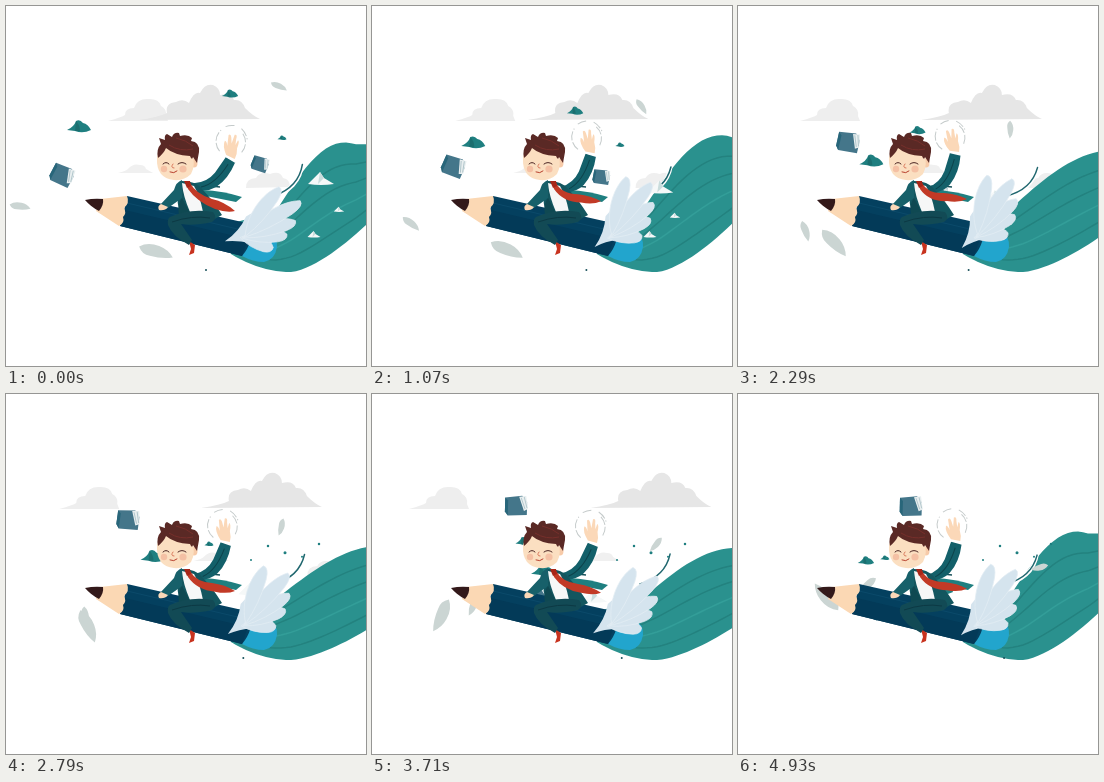
An HTML page for the animation above (5 s loop, 360 px wide and 360 px high).

```html
<!DOCTYPE html>
<html lang="en">
<head>
<meta charset="utf-8">
<title>Pencil flight</title>
<style>
html, body { margin: 0; width: 100%; height: 100%; overflow: hidden; background: #fff; }
svg { display: block; width: 100%; height: 100%; }
</style>
</head>
<body>
<svg viewBox="0 0 360 360">
  <defs>
    <g id="bird">
      <path d="M-12 3Q-5 0-3-6Q1-8 4-4Q9-3 12 3Q4 7-4 4Z"/>
      <path d="M-3-6Q1-2 1 4L-4 4Z" fill="#000" opacity=".13"/>
    </g>
    <g id="dart">
      <path d="M-13 4L-1-8L3-2L13 4Q0 6-13 4Z" fill="#f5f8f8"/>
      <path d="M-1-8L3-2L-3 4Z" fill="#c9dcdc"/>
    </g>
    <g id="book">
      <path d="M-11-8L6-10L11-4L11 9L-8 10L-11 6Z" fill="#44768a"/>
      <path d="M3-9L10-10L12 3L8 5Z" fill="#e9eff0"/>
      <path d="M-11-8L-8-5L-8 10L-11 6Z" fill="#28667a"/>
      <path d="M5-8L9 3M8-9L11 2" stroke="#9fb9bf" stroke-width=".7"/>
    </g>
    <g id="page">
      <path d="M-17-4Q-8-9 3-5Q12-2 17 6Q6 8-6 5Q-14 4-17-4Z" fill="#cbd5d3"/>
    </g>
  </defs>

  <g id="sky">
    <path id="cloudD" fill="#efefef" d="M-22 182Q-22 172-12 172Q-8 165 2 168Q12 164 15 172Q22 173 22 181Z"/>
    <path id="cloudB" fill="#eee" d="M-41 115Q-27 111-24 109Q-24 102-15 102Q-12 93-2 93Q10 92 12 100Q18 103 17 110L19 115Z"/>
    <path id="cloudA" fill="#e6e6e6" d="M-70 114Q-50 111-42 107Q-44 97-33 96Q-26 92-20 97Q-15 85-9 87Q-4 77 4 79Q11 82 11 89Q22 86 25 94Q33 93 36 102Q44 110 51 113Z"/>
    <path id="cloudC" fill="#f0f0f0" d="M-18 167Q-10 165-8 163Q-3 157 4 159Q9 159 10 163L17 167Z"/>
  </g>

  <path id="ribbon" fill="#2a918e"/>
  <g id="strands" fill="none" stroke-linecap="round"></g>
  <g id="swoosh" fill="none" stroke-linecap="round">
    <path d="M298 158C296 176 283 188 264 191" stroke="#fff" stroke-width="4"/>
    <path d="M298 160C295 174 285 185 268 190" stroke="#20676f" stroke-width="1.5"/>
  </g>
  <g id="ink" fill="#1f7f80"></g>
  <g id="drift"></g>
  <circle id="speck" cy="264" r="1" fill="#17505a"/>

  <path d="M196 184Q218 185 236 191L230 196L200 190Z" fill="#1f7f80"/>
  <path d="M196 179L214 181" stroke="#17505a" stroke-width="1.5"/>

  <g id="pencil">
    <path d="M240 217L262 226Q272 230 271 241Q269 254 258 256Q247 256 236 250Z" fill="#22a5cd"/>
    <path d="M121 190L245 218Q248 236 236 250L114 220L118 205Z" fill="#04405f"/>
    <path d="M119 204L242 233L236 250L114 220Z" fill="#033a58"/>
    <path d="M121 197L240 225" stroke="#0b4a6a"/>
    <path d="M94 193L121 190Q124 197 118 202Q121 207 117 211Q119 217 113 220L90 205Z" fill="#fbd8b4"/>
    <path d="M79 194Q88 192 97 193Q98 199 93 205Q85 201 79 194Z" fill="#33191a"/>
  </g>

  <g id="arm">
    <path d="M188 179Q201 177 208 166L217 149L227 153Q222 171 211 180Q203 186 193 185Z" fill="#13606a"/>
    <path d="M196 182Q210 177 220 156" stroke="#0d434c" fill="none"/>
    <path d="M216 149L218 145L229 150L227 154Z" fill="#fff"/>
    <path d="M217 147Q212 138 214 133Q216 133 217 138L217 127Q219 125 220 129L221 135L223 126Q226 125 225 130L225 136L227 131Q229 132 227 139Q228 145 226 150Z" fill="#fbd8b8"/>
    <path d="M210 144A15 15 0 0 1 209 123M213 119A18 18 0 0 1 223 117M231 124A15 15 0 0 1 231 144M229 119A19 19 0 0 1 236 129"
      fill="none" stroke="#c4caca" stroke-dasharray="9 2"/>
  </g>

  <g id="man">
    <path d="M183 235L189 239L188 247L183 249L185 243Z" fill="#c8331f"/>
    <path d="M176 175Q190 175 196 183Q206 193 216 209L205 215L175 211Q170 196 172 184Z" fill="#13565f"/>
    <path d="M176 177L188 180Q194 190 197 206L184 206Q177 190 176 177Z" fill="#f6f7f7"/>
    <path d="M176 174Q170 176 168 184L154 199Q156 204 162 202L176 192Z" fill="#17606a"/>
    <path d="M176 192L184 207L173 209Q171 198 176 192Z" fill="#0f4952"/>
    <path d="M155 198Q151 200 153 204Q159 205 162 201Z" fill="#fbd8b8"/>
    <path d="M164 211Q184 202 207 206Q212 212 206 216Q188 220 175 218L186 234L183 239Q166 230 162 219Q161 213 164 211Z" fill="#124a55"/>
    <path d="M166 216Q186 209 204 212" fill="none" stroke="#0c3944"/>
  </g>
  <path id="tie" fill="#c23a26"/>
  <path d="M178 175L184 175L185 180L181 182Z" fill="#a82618"/>

  <g id="head">
    <ellipse cx="188" cy="157" rx="3.5" ry="4.5" fill="#f7cba9"/>
    <path d="M151 152Q152 142 165 141L186 143Q190 160 185 168Q178 175 168 174Q150 172 151 152Z" fill="#fbdfc1"/>
    <path d="M152 152Q150 143 155 138L153 132L159 134Q158 129 161 128L166 131Q168 126 173 127L174 130Q182 128 186 132L185 135Q194 136 193 146L191 157L187 151Q186 155 184 150Q168 149 160 142Q158 147 152 152Z" fill="#5a2925"/>
    <path d="M163 139Q174 146 187 143M170 132Q180 134 187 140" fill="none" stroke="#762f2b"/>
    <circle cx="158" cy="163" r="3.2" fill="#f3b89c" opacity=".8"/>
    <circle cx="177" cy="163" r="3.6" fill="#f3b89c" opacity=".8"/>
    <g fill="none" stroke="#4a2422" stroke-linecap="round">
      <path d="M157 158Q160 155 163 158M172 158Q176 155 180 158"/>
      <path d="M167 158Q164 162 168 162" stroke="#d9795c"/>
      <path d="M164 166Q168 168 171 165" stroke="#b8402e"/>
    </g>
  </g>

  <g id="wing" fill="#d5e4ee">
    <path d="M221 239Q233 226 236 210Q250 196 262 200Q272 212 268 228Q262 238 246 235Q232 235 221 239Z"/>
  </g>
</svg>
<script>
const LOOP = 5000, FRAMES = 70, WAVE = 645;
const $ = id => document.getElementById(id);
const { sin, cos, min, PI } = Math;

function add(parent, tag, attrs) {
  const el = document.createElementNS('http://www.w3.org/2000/svg', tag);
  for (const k in attrs) el.setAttribute(k, attrs[k]);
  return parent.appendChild(el);
}

const move = (el, x, y = 0, rot = 0, scale = 1) =>
  el.setAttribute('transform', `translate(${x} ${y}) rotate(${rot}) scale(${scale})`);
const turn = (id, deg, x, y) => $(id).setAttribute('transform', `rotate(${deg} ${x} ${y})`);
const show = (id, on) => $(id).setAttribute('visibility', on ? 'visible' : 'hidden');

// Each path gives [x, y, rotation] after s seconds
const line = (x, y, vx, vy) => s => [x + vx * s, y + vy * s, 0];
const drifters = [];
function drift(shape, scale, path) {
  drifters.push({ el: add($('drift'), 'use', { href: '#' + shape, fill: '#1f7f80' }), scale, path });
}
drift('page', 1, s => [110 + 40 * cos(PI * s / 3.75), 245 - 1.7 * s * s, 2 + 5 * s + 1.55 * s ** 3]);
drift('page', .6, s => [14 + 23.5 * s, 200 + 25 * sin(PI * s / 4.4), 27 * s - 5]);
drift('page', .5, s => [273 - 5.5 * s + 2.3 * s * s, 80 + 19 * s, 10 + 28.5 * s]);
drift('book', 1, s => [56 + 23.7 * s, 139 + 30 * cos(PI * s / 4.3), 14 + 14 * cos(PI * s / 4.3)]);
drift('book', .75, s => [254 - 23 * s, 158 + 12 * s, 22 - 10 * s]);
drift('bird', 1, line(73, 121, 26.4, 15));
drift('bird', .68, line(224, 88, -19.5, 16));
drift('bird', .38, line(276, 132, -26.2, 6.5));
drift('dart', 1, line(315, 174, -25, 8));
drift('dart', .4, line(333, 204, -28, 5.6));
drift('dart', .5, line(308, 229, -28, 0));

for (let i = 0; i < 5; i++)
  add($('ink'), 'circle', { cx: 245 + 17 * i, cy: 158 + 8 * cos(2.4 * i), r: 1 + i % 3 * .25 });

// Feathers fan out from the wing root: angle, length
const root = [236, 228];
for (const [angle, len] of [[14, 34], [-10, 45], [-25, 55], [-41, 67], [-63, 60]])
  add($('wing'), 'path', {
    d: `M0 4C${len * .3} -9 ${len * .75} -11 ${len} -2Q${len + 1} 4 ${len * .8} 6Q${len * .4} 9 0 4Z`,
    transform: `translate(${root}) rotate(${angle})`,
    stroke: '#e3edf4', 'stroke-width': .7
  });

const strands = [.22, .42, .62, .82].map((f, i) => ({
  f, el: add($('strands'), 'path', { stroke: i === 2 ? '#339e99' : '#23827f', 'stroke-width': 1.5 })
}));

// Upper edge swells to a crest whose height and reach vary over the loop
function drawRibbon(t) {
  const swing = shift => cos(2 * PI * (t - shift) / LOOP);
  const height = 63 + 13 * swing(900), reach = 88 + 20 * swing(2700), end = 225 - 11 * swing(600);
  const top = x => x < 270
    ? 205 + (270 - x) * .28
    : 205 - height * sin(PI / 2 * min(1.15, (x - 270) / reach));
  const low = x => x < 285
    ? 266 - 18 * ((285 - x) / 60) ** 2
    : 266 - (266 - end) * ((x - 285) / 77) ** 1.5;
  const edge = (f, from) => {
    const pts = [];
    for (let x = from; x <= 365; x += 5) pts.push(`${x} ${top(x) + (low(x) - top(x)) * f}`);
    return pts;
  };
  $('ribbon').setAttribute('d', 'M' + [...edge(0, 225), ...edge(1, 225).reverse()].join('L') + 'Z');
  for (const { f, el } of strands) el.setAttribute('d', 'M' + edge(f, 250).join('L'));
}

function draw(t) {
  const s = t / 1000;
  const w = cos(2 * PI * (t / WAVE - .015));

  move($('cloudA'), 203 + 20 * s + .8 * s * s);
  move($('cloudB'), 143 - 17.5 * s);
  move($('cloudC'), 130 + 27.2 * s);
  move($('cloudD'), 262 + 22 * s);
  move($('speck'), 200 + 13.4 * s);
  show('sky', t < 4700);
  show('ink', t > 2700);

  drawRibbon(t);
  for (const { el, scale, path } of drifters) move(el, ...path(s), scale);

  turn('swoosh', -3 * w, 268, 190);
  turn('arm', 9 * w - 2, 203, 174);
  turn('wing', 13 * w, ...root);
  $('tie').setAttribute('d',
    `M180 176L184 177Q190 188 206 ${190 + 3 * w}Q219 ${192 + 4 * w} 229 ${199 + 6 * w}` +
    `Q221 ${202 + 5 * w} 209 ${199 + 4 * w}Q191 196 182 183Z`);
}

function tick() {
  const step = min(FRAMES - 1, Math.floor((performance.now() % LOOP + 5) * FRAMES / LOOP));
  draw(step * LOOP / FRAMES);
  requestAnimationFrame(tick);
}
tick();
</script>
</body>
</html>
```
